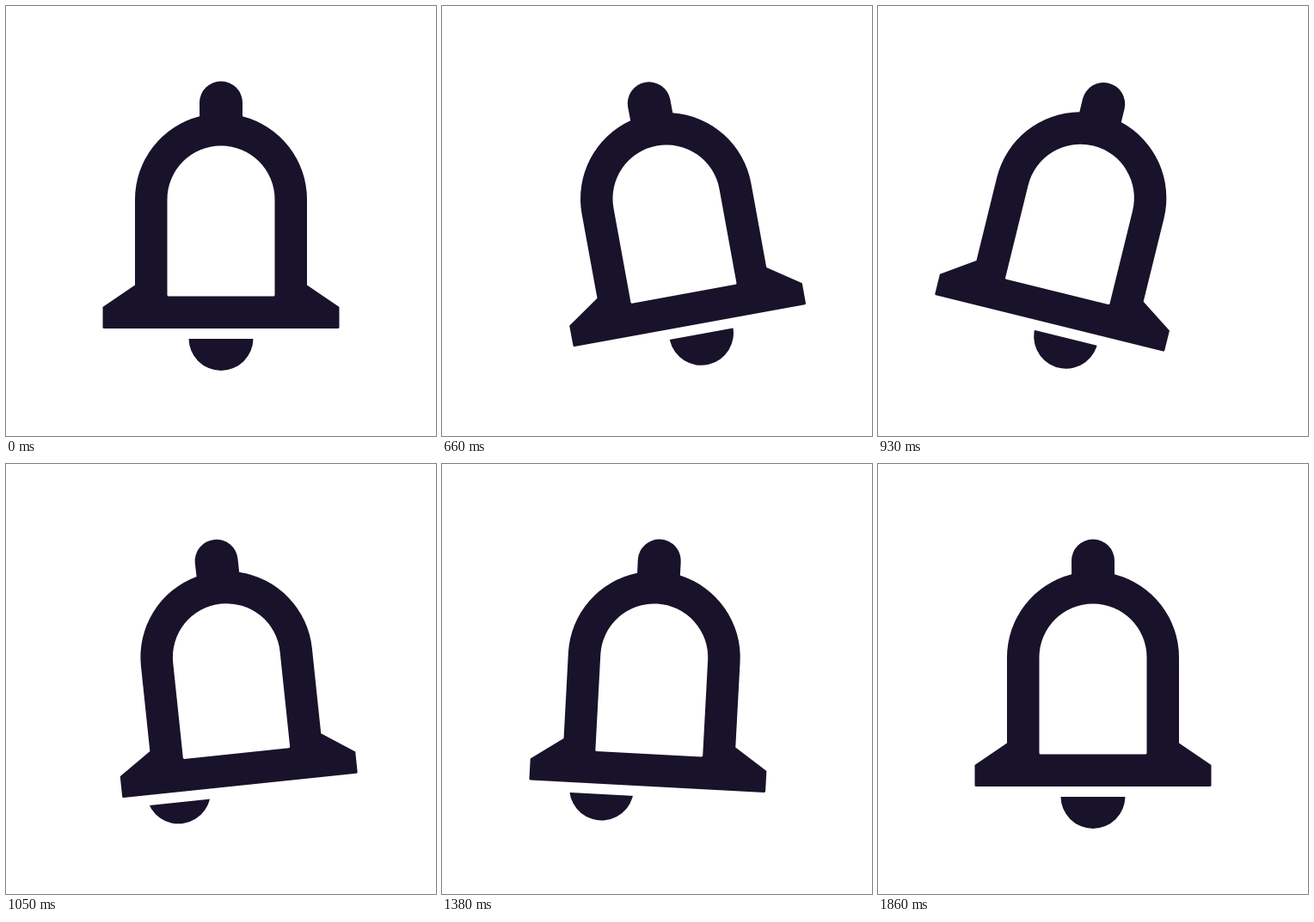
Animation, 500 px wide and 500 px high, one loop 2.16 s. Source, as an HTML page with a canvas:

```html
<!DOCTYPE html>
<html lang="en">
<head>
<meta charset="utf-8">
<title>Ringing bell</title>
<style>
html, body { margin: 0; width: 100%; height: 100%; overflow: hidden; background: #fff; }
canvas { display: block; width: 100vmin; height: 100vmin; }
</style>
</head>
<body>
<canvas id="stage" width="500" height="500"></canvas>
<script>
const ctx = document.getElementById('stage').getContext('2d');
const LOOP = 2160, STEP = 30;
const INK = '#18132a';
const PIVOT = { x: 250, y: 163.7 };

// [time in ms, angle in degrees]
const bellKeys = [[447, 0], [794, -15], [952, 15], [1110, -15], [1268, 15], [1431, 0]];
const clapperKeys = [[485, 0], [837, -27], [995, 27], [1150, -27], [1308, 27],
                     [1489, -4], [1665, 5], [1865, 0]];

// cubic-bezier(.42, 0, .58, 1)
function ease(x) {
  let lo = 0, hi = 1;
  for (let i = 0; i < 24; i++) {
    const s = (lo + hi) / 2, r = 1 - s;
    if (1.26 * s * r * r + 1.74 * s * s * r + s * s * s < x) lo = s;
    else hi = s;
  }
  return lo * lo * (3 - 2 * lo);
}

function angleAt(keys, t) {
  if (t <= keys[0][0]) return keys[0][1];
  for (let i = 1; i < keys.length; i++) {
    const [t0, a] = keys[i - 1], [t1, b] = keys[i];
    if (t < t1) return a + (b - a) * ease((t - t0) / (t1 - t0));
  }
  return keys[keys.length - 1][1];
}

function turn(deg) {
  ctx.translate(PIVOT.x, PIVOT.y);
  ctx.rotate(deg * Math.PI / 180);
  ctx.translate(-PIVOT.x, -PIVOT.y);
}

function makeBell() {
  const p = new Path2D();
  p.moveTo(150, 324.5);
  p.lineTo(150, 225);
  p.arc(250, 225, 100, Math.PI, Math.PI * 1.42);
  p.lineTo(225, 112.5);
  p.arc(250, 112.5, 25, Math.PI, 0);
  p.lineTo(275, 128.2);
  p.arc(250, 225, 100, Math.PI * 1.58, 0);
  p.lineTo(350, 324.5);
  p.lineTo(387.5, 350);
  p.arcTo(387.5, 375, 380, 375, 1.5);
  p.arcTo(112.5, 375, 112.5, 350, 1.5);
  p.lineTo(112.5, 350);
  p.closePath();
  p.moveTo(187.5, 225);
  p.arc(250, 225, 62.5, Math.PI, 0);
  p.arcTo(312.5, 337.5, 300, 337.5, 1.5);
  p.arcTo(187.5, 337.5, 187.5, 300, 1.5);
  p.closePath();
  return p;
}
const bell = makeBell();

function draw(t) {
  const bellAngle = angleAt(bellKeys, t);
  ctx.fillStyle = '#fff';
  ctx.fillRect(0, 0, 500, 500);
  ctx.fillStyle = INK;
  ctx.save();
  turn(bellAngle);
  ctx.fill(bell, 'evenodd');
  // The clapper shows only below the bell's rim
  ctx.beginPath();
  ctx.rect(-200, 387, 900, 300);
  ctx.clip();
  turn(angleAt(clapperKeys, t) - bellAngle);
  ctx.beginPath();
  ctx.arc(250, 386.4, 37.5, 0, Math.PI * 2);
  ctx.fill();
  ctx.restore();
}

function tick() {
  const t = performance.now() % LOOP;
  draw(Math.floor(t / STEP) * STEP);
  requestAnimationFrame(tick);
}
tick();
</script>
</body>
</html>
```
